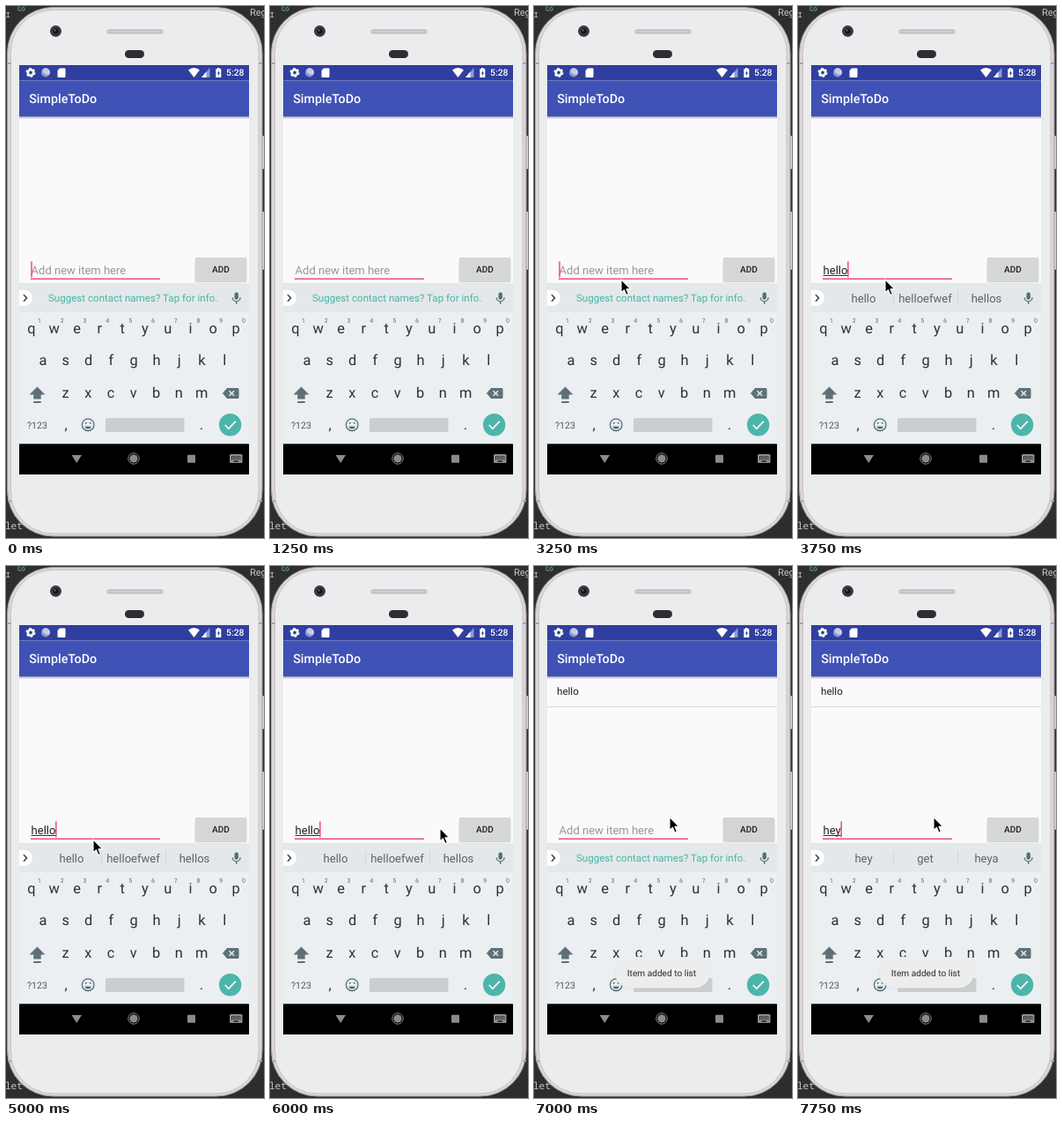
Write an HTML page that moves like this. It is 293 by 603 pixels and loops after 8000 ms.

```html
<!DOCTYPE html>
<html lang="en">
<head>
<meta charset="utf-8">
<title>To-do list</title>
<style>
  html, body { margin: 0; width: 100%; height: 100%; overflow: hidden; background: #2c2e30; }
  svg { display: block; width: 293px; height: 603px; font-family: Roboto, sans-serif; text-rendering: geometricPrecision; }
  .mid { text-anchor: middle; }
  .med { font-weight: 500; }
  .key { font-size: 16.4px; fill: #263238; text-anchor: middle; }
  .num { font-size: 7px; fill: #5c6a71; text-anchor: middle; }
  .word { font-size: 13.05px; fill: #56646b; text-anchor: middle; }
</style>
</head>
<body>
<svg viewBox="0 0 293 603" xmlns="http://www.w3.org/2000/svg">
  <defs>
    <linearGradient id="shade" x1="0" y1="0" x2="0" y2="1">
      <stop offset="0" stop-color="#000" stop-opacity=".28"/>
      <stop offset="1" stop-color="#000" stop-opacity="0"/>
    </linearGradient>
  </defs>

  <!-- editor behind the phone -->
  <rect width="293" height="603" fill="#2c2e30"/>
  <g fill="#c4c7c9" font-family="'Noto Sans Mono', monospace" font-size="11">
    <text x="-1" y="13">ɪ</text>
    <text x="277" y="11" font-family="Roboto, sans-serif">Reg</text>
    <text x="-1" y="593">let</text>
  </g>
  <path d="M14 0v5h7v-3M16 1l2 2 4-4" stroke="#62a36c" fill="none"/>

  <!-- phone -->
  <rect x="290" y="147" width="3" height="38" rx="1" fill="#d5d0d2"/>
  <rect x="290" y="233" width="3" height="66" rx="1" fill="#d5d0d2"/>
  <rect x="1.5" y="1.5" width="289.5" height="599.5" rx="52" fill="#dcd5d7" stroke="#a39c9f"/>
  <rect x="5.5" y="4.5" width="281.5" height="593.5" rx="48" fill="#ebecee" stroke="#c9c3c6"/>
  <path d="M2 65h4M287 65h4M2 561h4M287 561h4" stroke="#a9a3a6" stroke-width="2"/>
  <circle cx="56.5" cy="28.5" r="6.5" fill="#3a3b40"/>
  <circle cx="56.5" cy="28.5" r="3.2" fill="#15161a"/>
  <circle cx="55.5" cy="27.5" r="1.2" fill="#5a6070"/>
  <rect x="115" y="27" width="63" height="4" rx="2" fill="#cdcdcf" stroke="#a9a9ac" stroke-width=".8"/>
  <rect x="135" y="50" width="22" height="9" rx="4.5" fill="#2e2e32"/>

  <!-- app -->
  <rect x="15" y="67" width="261" height="464" fill="#fafafa"/>
  <rect x="15" y="125.4" width="261" height="3" fill="url(#shade)"/>
  <rect x="15" y="67" width="261" height="17.4" fill="#303f9f"/>
  <rect x="15" y="84.4" width="261" height="41" fill="#3f51b5"/>
  <text class="med" x="26.2" y="109.6" font-size="14.3" fill="#fff">SimpleToDo</text>

  <!-- status bar -->
  <g fill="#fff">
    <circle cx="28" cy="75.5" r="3.2" fill="none" stroke="#fff" stroke-width="2.6"/>
    <circle cx="28" cy="75.5" r="4.7" fill="none" stroke="#fff" stroke-width="1.6" stroke-dasharray="2.46 2.46"/>
    <circle cx="45" cy="75.5" r="5" fill="#8d96cb"/>
    <path d="M42 71.5a5 5 0 0 1 7.8 5.5a5 5 0 0 1-7.8-5.5" fill="#c5cae9"/>
    <path d="M61 70.5h5.5q1 0 1 1v8.5q0 1-1 1h-7q-1 0-1-1v-7z"/>
    <path d="M207 72.5q6.5-5 13 0l-6.5 8.5z"/>
    <path d="M231.5 70v11h-9.5z" fill="#8f99d0"/>
    <path d="M227.5 74.5v6.5h-5.5z"/>
    <path d="M240 70h2.5v1.2h1.8v9.8h-6v-9.8h1.7z"/>
    <path d="M241.8 73l-2 3.7h1.3v2.6l2-3.7h-1.3z" fill="#303f9f"/>
    <text class="med" x="250" y="79.3" font-size="10.4">5:28</text>
  </g>

  <g id="row">
    <text x="26" y="146" font-size="11.6" fill="#1d1d1d">hello</text>
    <path d="M15 159.5h261" stroke="#dcdcdc"/>
  </g>

  <!-- input -->
  <text id="entry" x="28.6" y="303.5" font-size="13"></text>
  <path id="mark" stroke="#333" stroke-width="1"/>
  <rect x="28" y="308.6" width="147" height="1.45" fill="#f5427f"/>
  <rect id="caret" y="289.5" width="1.5" height="18" fill="#f5427f"/>
  <rect x="214.5" y="286" width="59" height="27.3" rx="2" fill="#000" opacity=".16"/>
  <rect id="button" x="215" y="285" width="58" height="27" rx="1.5"/>
  <text class="med mid" x="244" y="302" font-size="10.15" fill="#202020">ADD</text>

  <!-- keyboard -->
  <rect x="15" y="314" width="261" height="183" fill="#eceff1"/>
  <rect x="15" y="314" width="261" height="33" fill="#e4e8ea"/>
  <path d="M15 322h6a9 9 0 0 1 0 18h-6z" fill="#fff"/>
  <path d="M20 327.3l3.6 3.7-3.6 3.7" fill="none" stroke="#37474f" stroke-width="1.5"/>
  <text id="notice" x="47.9" y="335.2" font-size="11.6" fill="#45b5a9">Suggest contact names? Tap for info.</text>
  <g id="words">
    <path d="M108.5 323v17M181.5 323v17" stroke="#cfd5d8"/>
    <text class="word" x="74.5" y="336"></text>
    <text class="word" x="144.5" y="336"></text>
    <text class="word" x="214" y="336"></text>
  </g>
  <rect x="259.5" y="324.5" width="4.4" height="8.2" rx="2.2" fill="#546e7a"/>
  <path d="M257.3 330.5a4.4 4.4 0 0 0 8.8 0M261.7 335v3" fill="none" stroke="#546e7a" stroke-width="1.3"/>
  <g id="keys"></g>
  <g fill="#5f7078">
    <path d="M35.5 431.5l9 9h-4.8v5h-8.4v-5h-4.8z"/>
    <rect x="31.3" y="448" width="8.4" height="2"/>
    <path d="M251 433h12q1.5 0 1.5 1.5v9q0 1.5-1.5 1.5h-12l-5-6z"/>
    <path d="M253.5 436.2l5.6 5.6m0-5.6l-5.6 5.6" stroke="#eceff1" stroke-width="1.4"/>
  </g>
  <text x="24" y="479" font-size="10.6" fill="#455a64">?123</text>
  <circle cx="93.2" cy="474.7" r="6.8" fill="none" stroke="#546e7a" stroke-width="1.3"/>
  <path d="M89.6 476.4a3.7 3.7 0 0 0 7.2 0z" fill="#546e7a"/>
  <circle cx="90.8" cy="472.7" r="1" fill="#546e7a"/>
  <circle cx="95.6" cy="472.7" r="1" fill="#546e7a"/>
  <rect x="113" y="467" width="89.5" height="16" rx="1.5" fill="#c9ced1"/>
  <circle cx="254.6" cy="474.7" r="12.7" fill="#4db6ac"/>
  <path d="M248.8 475l4 4 8-8.2" fill="none" stroke="#fff" stroke-width="1.7"/>

  <!-- navigation -->
  <rect x="15" y="496.3" width="261" height="34.7" fill="#000"/>
  <g fill="#8b8b8b">
    <path d="M74.5 509h11.5l-5.7 9z"/>
    <circle cx="145" cy="513" r="4.6"/>
    <circle cx="145" cy="513" r="6.2" fill="none" stroke="#8b8b8b"/>
    <rect x="206" y="508.7" width="9" height="9" rx=".8"/>
    <rect x="254" y="508" width="14.5" height="10" rx="1.3"/>
    <path d="M256 510.8h11M256 513.2h11" stroke="#000" stroke-width="1.2" stroke-dasharray="1.2 .9"/>
    <path d="M258.5 516h5.5" stroke="#000" stroke-width="1.2"/>
  </g>

  <g id="toast">
    <rect x="91.5" y="443.5" width="109" height="36" rx="17.5" fill="#000" opacity=".05"/>
    <rect x="92" y="443" width="108" height="35.5" rx="17.5" fill="#eeedee"/>
    <text class="mid" x="145" y="464.6" font-size="10.15" fill="#2b2b2b">Item added to list</text>
  </g>

  <path id="mouse" d="M0 0V15L3.4 11.8L5.9 17.6L8.4 16.5L5.9 10.9H10.7Z" fill="#000" stroke="#fff" stroke-width="1.1" stroke-linejoin="round"/>
</svg>
<script>
  const LOOP = 8000;
  const $ = id => document.getElementById(id);
  const show = (id, on) => $(id).setAttribute("visibility", on ? "visible" : "hidden");

  const keys = [];
  const addRow = (letters, x, y, numbered) => [...letters].forEach((c, i) => {
    const cx = x + i * 25.78;
    keys.push(`<text class="key" x="${cx}" y="${y}">${c}</text>`);
    if (numbered) keys.push(`<text class="num" x="${cx + 9}" y="359">${(i + 1) % 10}</text>`);
  });
  addRow("qwertyuiop", 29, 371, true);
  addRow("asdfghjkl", 42, 407);
  addRow("zxcvbnm", 67.5, 444);
  addRow(",", 68, 479.5);
  addRow(".", 222, 479.5);
  $("keys").innerHTML = keys.join("");

  // Each step changes part of the state and holds until the next one.
  const steps = [
    [0, { text: "", caret: 1, mouse: null, words: "", row: 0, toast: 0, button: "#d6d7d7" }],
    [250, { caret: 0 }],
    [750, { caret: 1 }],
    [1250, { caret: 0 }],
    [1500, { mouse: [192, 269] }],
    [1750, { caret: 1, mouse: [122, 377] }],
    [2000, { mouse: [99, 310] }],
    [2250, { caret: 0 }],
    [2500, { caret: 1, text: "h" }],
    [3000, { caret: 0 }],
    [3250, { caret: 1, text: "" }],
    [3500, { text: "hel", words: "hello help held" }],
    [3750, { text: "hello", words: "hello helloefwef hellos" }],
    [4500, { caret: 0 }],
    [5000, { caret: 1 }],
    [5500, { caret: 0 }],
    [6000, { caret: 1, mouse: [193, 297] }],
    [6250, { mouse: [240, 296], button: "#cccdcd" }],
    [6500, { text: "", row: 1, toast: 0.35, button: "#c8c9c9" }],
    [6750, { words: "", mouse: [154, 284.5], toast: 0.8, button: "#cfd0d0" }],
    [7000, { caret: 0, toast: 1, button: "#d3d4d4" }],
    [7500, { caret: 1, button: "#d6d7d7" }],
    [7750, { text: "hey", words: "hey get heya" }]
  ];

  const stateAt = t => Object.assign({}, ...steps.filter(s => s[0] <= t).map(s => s[1]));

  function draw(t) {
    const s = stateAt(t);
    const entry = $("entry");
    entry.textContent = s.text || "Add new item here";
    entry.setAttribute("fill", s.text ? "#202020" : "#989898");
    const width = s.text ? entry.getComputedTextLength() : 0;
    $("mark").setAttribute("d", `M28.6 305.5h${width}`);
    show("mark", s.text);
    $("caret").setAttribute("x", 28.3 + width);
    show("caret", s.caret);

    const words = s.words.split(" ");
    $("words").querySelectorAll("text").forEach((el, i) => { el.textContent = words[i] || ""; });
    show("words", s.words);
    show("notice", !s.words);

    show("row", s.row);
    $("toast").setAttribute("opacity", s.toast);
    $("button").setAttribute("fill", s.button);
    show("mouse", s.mouse);
    if (s.mouse) $("mouse").setAttribute("transform", `translate(${s.mouse})`);
  }

  const start = performance.now();
  function tick() {
    draw((performance.now() - start) % LOOP);
    requestAnimationFrame(tick);
  }
  tick();
</script>
</body>
</html>
```
